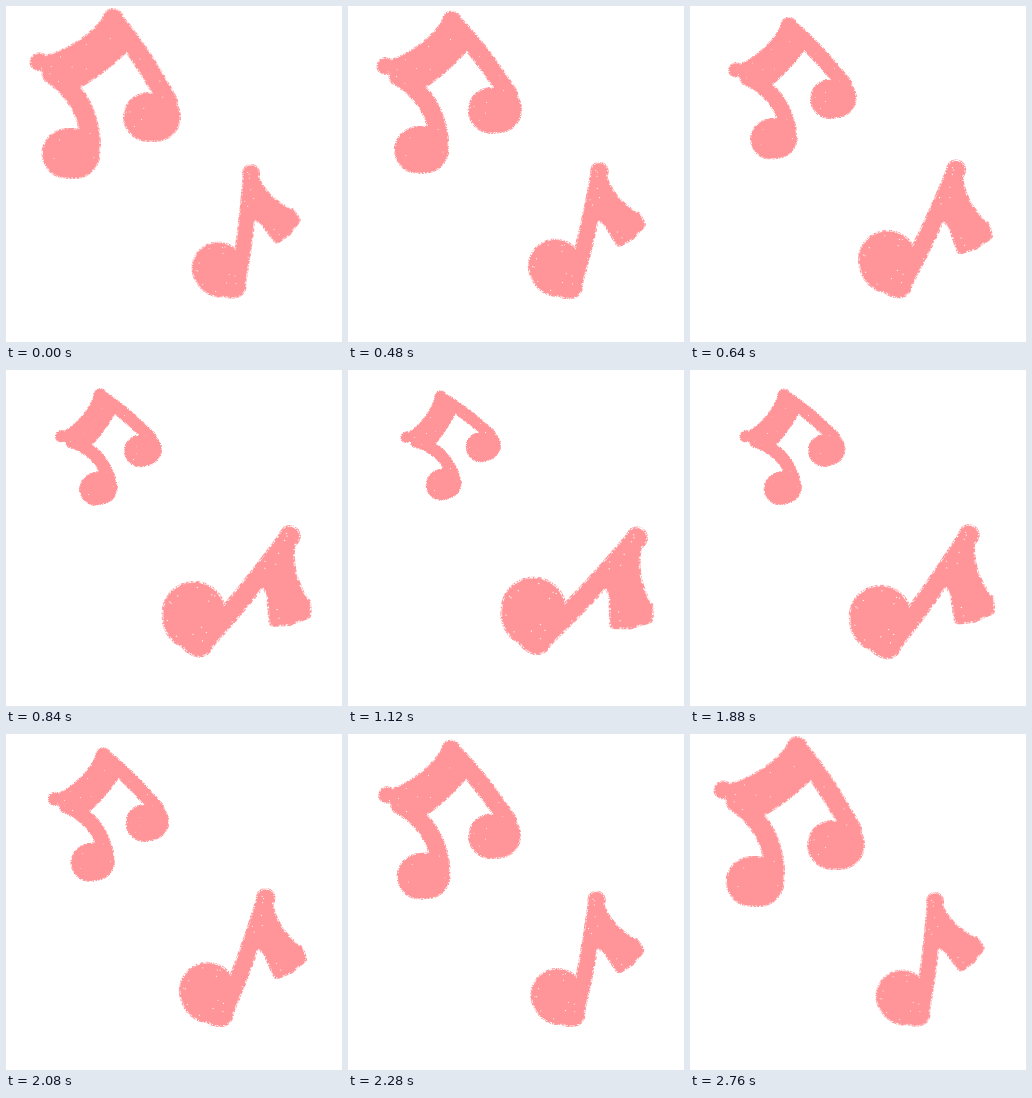
Write an HTML page with a canvas that moves like this. It is 336x336 px and loops after 2880 ms.

```html
<!DOCTYPE html>
<html lang="en">
<head>
<meta charset="utf-8">
<title>Music notes</title>
<style>
  html, body { margin: 0; width: 100%; height: 100%; overflow: hidden; background: #fff; }
  canvas { display: block; width: 336px; height: 336px; }
</style>
</head>
<body>
<canvas id="stage" width="336" height="336"></canvas>
<script>
const ctx = document.getElementById('stage').getContext('2d');
const SIZE = 336, DETAIL = 2;
const LOOP = 2880, STEP = 40, OUT_TIME = 1280;
const PINK = '#ff9599';

// Each part is a thick crayon line [path, width]; closed paths are also filled.
const doubleNote = {
  parts: [
    ['M30 56Q76 46 102 12L119 42Q97 65 70 79Z', 6],  // beam
    ['M33 56h1', 16],                                // beam corner
    ['M107 13v2', 19],                               // beam tip
    ['M46 68Q84 94 84.5 140', 18],                   // left stem
    ['M109 16Q134 45 162 96', 17.5],                 // right stem
    ['M61 147.5h8', 48],                             // left head
    ['M142 111h8', 47]                               // right head
  ],
  pivot: [99.5, 39.5], target: [93.6, 44.1], angle: -19.5, scale: 0.617,
  spinPower: 3, back: 1370, backTime: 1530
};

const singleNote = {
  parts: [
    ['M245 167v1', 15],                              // tip
    ['M245 170Q241 225 232 275', 14],                // stem
    ['M250 175Q262 198 286 207L290 214L281 226L271 233L262 221Q255 211 245 210Z', 6], // flag
    ['M212 262l2 3', 50],                            // head
    ['M224 280h4', 22]                               // foot of the head
  ],
  pivot: [241, 226], target: [241.4, 224.5], angle: 36, scale: 1.25,
  spinPower: 4, back: 1280, backTime: 1480
};

const notes = [doubleNote, singleNote];

let seed = 911;
function random() {
  return (seed = seed * 16807 % 2147483647) / 2147483647;
}

function drawParts(pen, parts, grow) {
  for (const [data, width] of parts) {
    const path = new Path2D(data);
    pen.lineWidth = width + grow;
    pen.stroke(path);
    if (data.endsWith('Z')) pen.fill(path);
  }
}

function erodeDots(pen, count, size) {
  pen.globalCompositeOperation = 'destination-out';
  for (let i = 0; i < count; i++) {
    pen.fillRect(random() * SIZE, random() * SIZE, size, size);
  }
  pen.globalCompositeOperation = 'source-over';
}

// A grainy rim under a solid core, with a few pinholes.
function crayonSprite(parts) {
  const sprite = document.createElement('canvas');
  sprite.width = sprite.height = SIZE * DETAIL;
  const pen = sprite.getContext('2d');
  pen.scale(DETAIL, DETAIL);
  pen.lineCap = pen.lineJoin = 'round';
  pen.fillStyle = pen.strokeStyle = PINK;
  drawParts(pen, parts, 3);
  erodeDots(pen, 60000, 1);
  drawParts(pen, parts, 0);
  erodeDots(pen, 350, 0.9);
  return sprite;
}

for (const note of notes) note.sprite = crayonSprite(note.parts);

function ease(t, power) {
  t = Math.min(1, Math.max(0, t));
  return t < 0.5 ? (2 * t) ** power / 2 : 1 - (2 - 2 * t) ** power / 2;
}

const mix = (a, b, p) => a + (b - a) * p;

function drawNote(note, time) {
  const progress = power =>
    ease(time / OUT_TIME, power) - ease((time - note.back) / note.backTime, power);
  const move = progress(4), spin = progress(note.spinPower);
  const size = mix(1, note.scale, move);
  const [x, y] = note.pivot;
  ctx.save();
  ctx.translate(mix(x, note.target[0], move), mix(y, note.target[1], move));
  ctx.rotate(note.angle * spin * Math.PI / 180);
  ctx.scale(size, size);
  ctx.drawImage(note.sprite, -x, -y, SIZE, SIZE);
  ctx.restore();
}

function render() {
  const time = Math.floor(performance.now() % LOOP / STEP) * STEP;
  ctx.fillStyle = '#fff';
  ctx.fillRect(0, 0, SIZE, SIZE);
  for (const note of notes) drawNote(note, time);
  requestAnimationFrame(render);
}
render();
</script>
</body>
</html>
```
